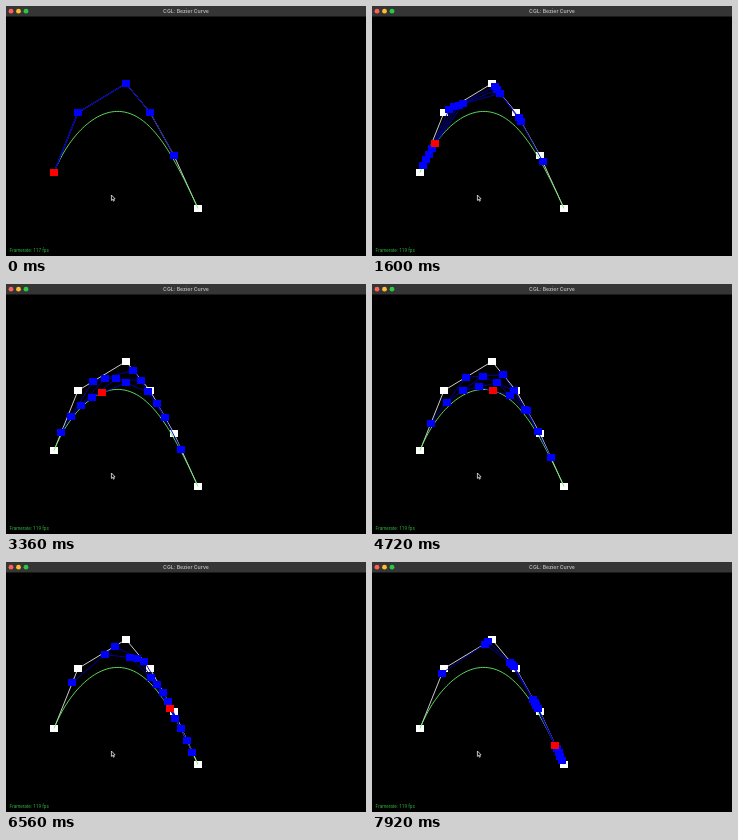
These frames come from a looping animation (360x250 px, 8 s). An HTML page with a canvas:

```html
<!DOCTYPE html>
<html lang="en">
<head>
<meta charset="utf-8">
<title>Bezier Curve</title>
<style>
  html, body { margin: 0; width: 100%; height: 100%; overflow: hidden; background: #000; }
  canvas { display: block; }
</style>
</head>
<body>
<canvas id="stage" width="360" height="250"></canvas>
<script>
const ctx = document.getElementById('stage').getContext('2d');
const LOOP = 8000, STEP = 80, START = 480;
const controls = [[48, 166.5], [72, 106.5], [120, 77.5], [144, 106.5], [168, 149.5], [192, 202.5]];

// Time (ms) and curve parameter where the hand-driven pace changes.
const pace = [[START, 0], [1600, 0.109], [4720, 0.456], [5600, 0.614], [6560, 0.766], [7920, 0.925]];

const lerp = (a, b, t) => a + (b - a) * t;

function parameterAt(ms) {
  const time = Math.max(START, Math.floor(ms / STEP) * STEP);
  const i = Math.max(1, pace.findIndex(([end]) => end >= time));
  const [from, t0] = pace[i - 1], [to, t1] = pace[i];
  return lerp(t0, t1, (time - from) / (to - from));
}

const reduce = (points, t) => points.slice(1).map((p, i) =>
  [lerp(points[i][0], p[0], t), lerp(points[i][1], p[1], t)]);

// All levels of de Casteljau's construction, ending with the point on the curve.
function levels(t) {
  const result = [];
  for (let points = controls; points.length > 1;) result.push(points = reduce(points, t));
  return result;
}

const curve = Array.from({ length: 101 }, (_, i) => levels(i / 100).pop()[0]);

function polyline(points, color, width) {
  ctx.beginPath();
  points.forEach(p => ctx.lineTo(...p));
  ctx.strokeStyle = color;
  ctx.lineWidth = width;
  ctx.stroke();
}

function squares(points, color) {
  ctx.fillStyle = color;
  for (const [x, y] of points) ctx.fillRect(Math.round(x - 4), Math.round(y - 3.5), 8, 7);
}

function text(str, x, y, font, color, align) {
  ctx.font = font;
  ctx.fillStyle = color;
  ctx.textAlign = align;
  ctx.fillText(str, x, y);
}

function titleBar() {
  ctx.fillStyle = '#353535';
  ctx.fillRect(0, 0, 360, 10.5);
  ['#ff5f57', '#febc2e', '#28c840'].forEach((color, i) => {
    ctx.fillStyle = color;
    ctx.beginPath();
    ctx.arc(5 + i * 7.5, 5.2, 2.4, 0, 7);
    ctx.fill();
  });
  text('CGL: Bezier Curve', 180, 7.2, '600 5.2px Inter, sans-serif', '#b8b8b8', 'center');
}

function cursor() {
  const outline = [[0, 0], [0, 5.4], [1.2, 4.3], [2, 6.2], [2.9, 5.8], [2.1, 4], [3.7, 3.9], [0, 0]];
  polyline(outline.map(([x, y]) => [x + 105.4, y + 189]), '#eee', 0.8);
}

function draw(ms) {
  ctx.fillStyle = '#000';
  ctx.fillRect(0, 0, 360, 250);

  polyline(controls, '#fff', 0.8);
  squares(controls, '#fff');
  polyline(curve, '#66f066', 0.9);

  const steps = levels(parameterAt(ms));
  const [point] = steps.pop();
  steps.forEach(points => polyline(points, '#0000b0', 0.9));
  steps.forEach(points => squares(points, '#00f'));
  squares([point], '#f00');

  const fps = ms < START ? 117 : 119;
  text(`Framerate: ${fps} fps`, 3.6, 245.7, '4.7px Roboto, sans-serif', '#2fae3c', 'left');
  titleBar();
  cursor();
}

function frame() {
  draw(performance.now() % LOOP);
  requestAnimationFrame(frame);
}
frame();
</script>
</body>
</html>
```
